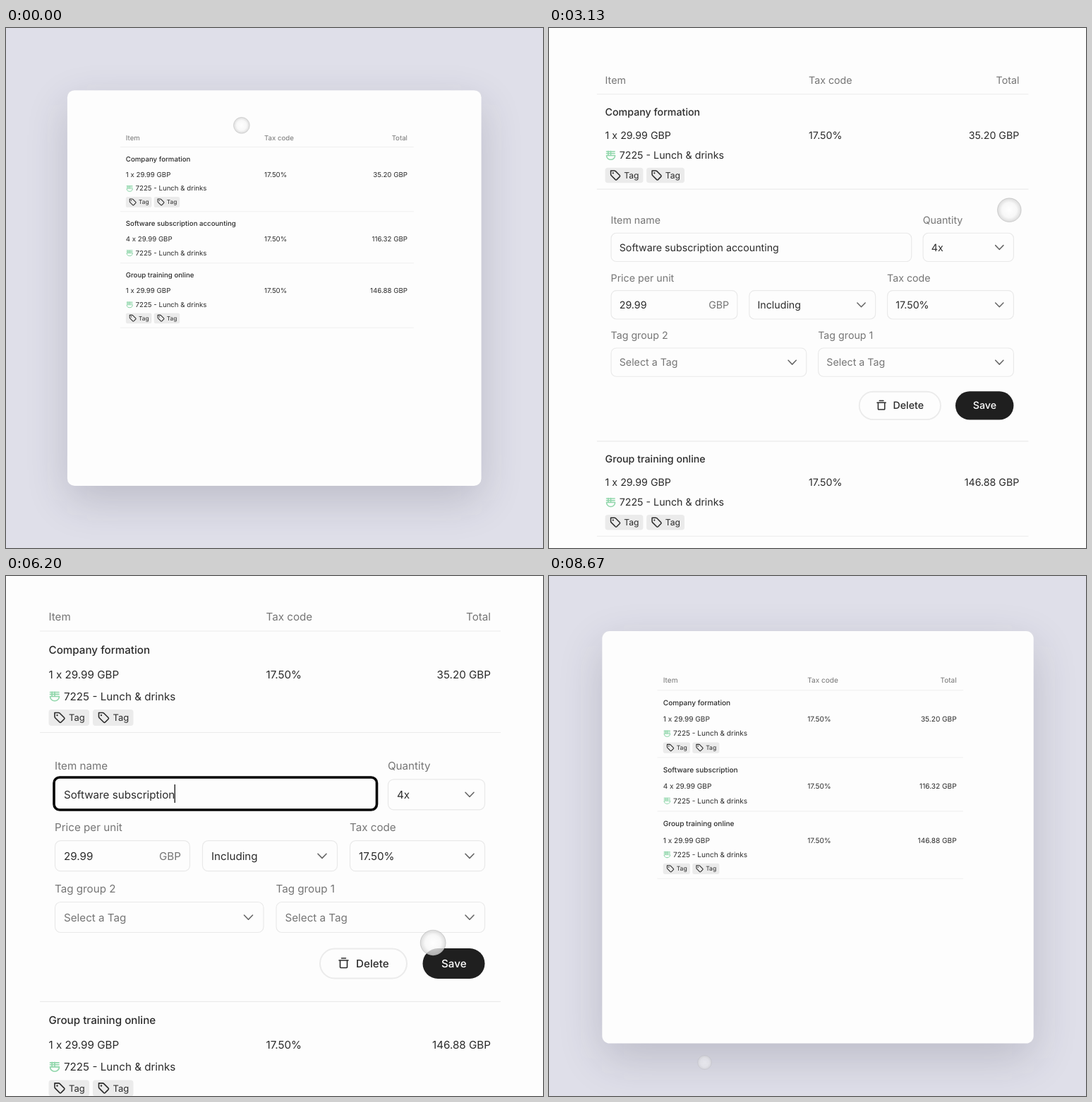
An HTML page for the animation above (8740 ms loop, 761 by 736 pixels).

```html
<!DOCTYPE html>
<html lang="en">
<head>
<meta charset="utf-8">
<title>Edit a line item</title>
<style>
  html, body { margin: 0; width: 100%; height: 100%; overflow: hidden; background: #dfdfe9; }
  svg { display: block; }
  text {
    font: 400 15.2px Inter, sans-serif; font-optical-sizing: none;
    fill: #2b2b2b; white-space: pre; text-rendering: geometricPrecision;
  }
  .muted { fill: #757575; }
  .bold { font-weight: 500; }
  .small { font-size: 13px; }
  .light { fill: #fff; }
  .rule { stroke: #ebebeb; stroke-width: 1.2; }
  .icon { fill: none; stroke: #2b2b2b; stroke-width: 1.6; stroke-linecap: round; stroke-linejoin: round; }
  .chevron { stroke: #666; }
  .field { fill: #fdfdfd; stroke: #e9e9e9; stroke-width: 1.2; }
</style>
</head>
<body>
<svg id="stage" width="761" height="736" viewBox="0 0 761 736"></svg>
<script>
const LOOP = 8740;
const FAR = 0.637;                 // camera scale when the whole card is visible
const FOCUS = { x: 361.7, y: 327 }; // point that stays put while zooming
const GROWTH = 266.3;              // extra row height while editing
const FULL_NAME = 'Software subscription accounting';
const SHORT_NAME = 'Software subscription';

// ---- drawing helpers: y is the middle of the capitals ----
const text = (x, y, str, cls = '', more = '') =>
  `<text x="${x}" y="${y + 5.5}" class="${cls}" ${more}>${str}</text>`;
const endText = (x, y, str, cls) => text(x, y, str, cls, 'text-anchor="end"');
const rule = y => `<path class="rule" d="M48 ${y}H701"/>`;
const at = (x, y, body, id = '') => `<g ${id && `id="${id}"`} transform="translate(${x} ${y})">${body}</g>`;
const chevron = (x, y) => at(x, y, '<path class="icon chevron" d="M-6-3L0 3.2 6-3"/>');

const bowl = (x, y) => at(x, y,
  `<path class="icon" style="stroke:#8fd6aa" d="M-6.5 0.5H6.5A6.5 6.3 0 0 1-6.5 0.5ZM-6.5-5.5H6M-6.5-2.6H6M-3.8-6V0M0-6V0"/>`);

const tag = (x, y) => at(x, y,
  `<rect y="-11.5" width="57.5" height="23" rx="4" fill="#ebebeb"/>
   <path class="icon" d="M8.500-7H14Q15 -7 15.700-6.300L22 0Q23 1 22 2L17.500 6.500Q16.500 7.400 15.500 6.500L9.200 .200Q8.500-.500 8.500-1.500Z"/>
   <circle cx="12" cy="-3.400" r="1.200" fill="#2b2b2b"/>` + text(28.5, -0.8, 'Tag', 'small'));

const row = (y, title, qty, total, tags, titleId = '') =>
  text(60.5, y, title, 'bold', titleId && `id="${titleId}"`) +
  text(60.5, y + 35, `${qty} x 29.99 GBP`) + text(368.5, y + 35, '17.50%') +
  endText(687, y + 35, total) +
  bowl(69, y + 65.5) + text(82, y + 65.5, '7225 - Lunch &amp; drinks') +
  (tags ? tag(60.5, y + 96) + tag(123, y + 96) : '');

const field = (x, y, width, label, value, { muted, select, labelX = x, id = '' } = {}) =>
  text(labelX, y - 41, label, 'muted') +
  `<rect id="${id}Box" class="field" x="${x + .5}" y="${y - 21.5}" width="${width}" height="43" rx="8"/>` +
  text(x + 13, y, value, muted ? 'muted' : '', id && `id="${id}Value"`) +
  (select ? chevron(x + width - 21, y) : '');

const trash = at(478.500, 548,
  '<path class="icon" d="M-6.500-4H6.500M-3-7H3M-5-4V5.500Q-5 6.500-4 6.500H4Q5 6.500 5 5.500V-4"/>');

const spinner = at(586, 548.5, Array.from({ length: 8 }, (_, i) =>
  `<path class="tick" d="M0-4V-7" stroke="#a8a8a8" stroke-width="1.7" stroke-linecap="round" transform="rotate(${i * 45})"/>`).join(''));

const form = `<g id="form">
  ${field(69, 309.3, 454.5, 'Item name', FULL_NAME, { id: 'name' })}
  ${field(541, 309.3, 137, 'Quantity', '4x', { select: true })}
  ${field(69, 396.2, 191, 'Price per unit', '29.99')}
  ${endText(248, 396.2, 'GBP', 'muted')}
  ${field(278, 396.2, 191, '', 'Including', { select: true })}
  ${field(487, 396.2, 191, 'Tax code', '17.50%', { select: true, id: 'tax' })}
  <g id="taxHover">
    <rect x="487.5" y="374.7" width="191" height="43" rx="8" fill="none" stroke="#999" stroke-width="1.2"/>
    <path class="icon" style="stroke:#c9c9c9;stroke-width:1.2" d="M625.500 391.500l10 10m0-10l-10 10"/>
  </g>
  ${field(69, 483, 295.5, 'Tag group 2', 'Select a Tag', { muted: true, select: true })}
  ${field(382.5, 483, 295.5, 'Tag group 1', 'Select a Tag', { muted: true, select: true })}
  <g id="focus">
    <rect x="68" y="285" width="457.5" height="46" rx="8" fill="none" stroke="#050505" stroke-width="3.6"/>
    <path id="caret" d="M0 295V321" stroke="#222" stroke-width="1.4"/>
  </g>
  <g id="delete">
    <rect x="445" y="527.5" width="123" height="42" rx="21" fill="#fdfdfd" stroke="#ebebeb" stroke-width="2"/>
    ${trash}${text(496, 548.3, 'Delete', 'bold')}
  </g>
  <g id="save">
    <rect x="590.500" y="527" width="88" height="43" rx="21.500" fill="#1f1f1f"/>
    ${text(617, 548.3, 'Save', 'bold light')}
  </g>
  <g id="saving">
    <rect x="552.500" y="527" width="126.500" height="43" rx="21.500" fill="#f3f3f3"/>
    ${spinner}${text(604, 548.3, 'Saving', 'bold', 'style="fill:#c4c4c4"')}
  </g>
</g>`;

const editButton = at(672, 252,
  '<path class="icon" d="M-5 4.500L-4.300 1 3-6.300 5.800-3.500-1.500 3.800ZM0 5.500H6"/>', 'edit');
const tooltip = `<g id="tooltip">
  <path d="M664 219.500h13l-6.500 7.500z" fill="#1f1f1f"/>
  <rect x="642" y="178.500" width="55" height="42" rx="5" fill="#1f1f1f"/>
  ${text(669.5, 198.7, 'Edit', 'bold light', 'text-anchor="middle"')}
</g>`;

const stage = document.getElementById('stage');
stage.innerHTML = `
<defs>
  <filter id="soft" x="-25%" y="-25%" width="150%" height="150%"><feGaussianBlur stdDeviation="48"/></filter>
  <radialGradient id="glass">
    <stop offset="0" stop-color="#fff" stop-opacity=".8"/>
    <stop offset=".62" stop-color="#f6f6f6" stop-opacity=".75"/>
    <stop offset="1" stop-color="#d2d2d2" stop-opacity=".8"/>
  </radialGradient>
</defs>
<rect width="761" height="736" fill="#dfdfe9"/>
<g id="world">
  <rect x="-69.700" y="-16" width="921" height="879" rx="16" fill="#1e1e32" opacity=".18" filter="url(#soft)"/>
  <rect x="-69.700" y="-48" width="921" height="879" rx="16" fill="#fdfdfd"/>
  ${text(60.5, 57, 'Item', 'muted')}${text(368.5, 57, 'Tax code', 'muted')}${endText(687, 57, 'Total', 'muted')}
  ${rule(78)}
  ${row(104.5, 'Company formation', 1, '35.20 GBP', true)}
  ${rule(221.5)}
  <g id="summary">${row(247.8, FULL_NAME, 4, '116.32 GBP', false, 'title')}${editButton}${tooltip}</g>
  <g id="below">${rule(336)}${row(362.6, 'Group training online', 1, '146.88 GBP', true)}${rule(479.5)}</g>
  ${form}
  <g id="cursor"><circle r="18" fill="url(#glass)" stroke="#000" stroke-opacity=".13" stroke-width="1"/></g>
</g>`;

const $ = Object.fromEntries([...stage.querySelectorAll('[id]')].map(el => [el.id, el]));
const ticks = [...stage.querySelectorAll('.tick')];

// ---- motion ----
const ramp = (t, from, to) => Math.min(1, Math.max(0, (t - from) / (to - from)));
const smooth = u => (1 - Math.cos(Math.PI * u)) / 2;
const spring = (t, start, rate) => {
  const x = Math.max(0, t - start) * rate;
  return 1 - (1 + x) * Math.exp(-x);
};
const fade = (el, v) => { el.style.opacity = v; el.style.display = v > 0 ? '' : 'none'; };

// from, to, start point, bend, end point
const MOVES = [
  [0, 1650, [318, 30], [400, 270], [672, 253]],
  [3350, 4250, [672, 253], [581, 592], [370, 306]],
  [5650, 6350, [370, 306], [500, 400], [634, 551]],
  [7980, 8690, [634, 551], [440, 760], [148, 872]],
];
function cursorAt(t) {
  const [from, to, a, b, c] = MOVES.filter(m => t >= m[0]).pop();
  const u = smooth(ramp(t, from, to)), v = 1 - u;
  return [0, 1].map(i => v * v * a[i] + 2 * u * v * b[i] + u * u * c[i]);
}

const CLICKS = [2520, 4350, 6420];
const press = t => CLICKS.reduce((s, c) => s - 0.14 * Math.max(0, 1 - Math.abs(t - c) / 110), 1);

function render(t) {
  const zoom = spring(t, 2650, .0066) - spring(t, 7960, .006);
  const k = FAR + (1 - FAR) * zoom;
  $.world.setAttribute('transform',
    `translate(${FOCUS.x * (1 - k)} ${FOCUS.y * (1 - k)}) scale(${k})`);

  const open = smooth(ramp(t, 2612, 2912)) - smooth(ramp(t, 7430, 7730));
  fade($.form, open);
  fade($.summary, 1 - open);
  $.below.setAttribute('transform', `translate(0 ${GROWTH * open})`);
  $.title.textContent = t < 5000 ? FULL_NAME : SHORT_NAME;
  fade($.edit, t < 4000 ? ramp(t, 1050, 1200) : 0);
  fade($.tooltip, t < 4000 ? ramp(t, 1680, 1800) : 0);

  fade($.taxHover, ramp(t, 3500, 3600) - ramp(t, 3800, 3930));

  const erased = Math.min(11, Math.max(0, Math.floor((t - 4560) / 55)));
  $.nameValue.textContent = FULL_NAME.slice(0, FULL_NAME.length - erased);
  const focused = t >= 4350 && t < 6420;
  fade($.focus, focused ? 1 : 0);
  if (focused) $.caret.setAttribute('transform', `translate(${82 + $.nameValue.getComputedTextLength()} 0)`);

  const saving = ramp(t, 6450, 6570);
  fade($.save, 1 - saving);
  fade($.saving, saving);
  $.delete.setAttribute('transform', `translate(${-39 * smooth(saving)} 0)`);
  const head = Math.floor(t / 100);
  ticks.forEach((el, i) => { el.style.opacity = 1 - ((head - i + 800) % 8) * .1; });

  const [x, y] = cursorAt(t);
  const leaving = ramp(t, 8350, 8740);
  $.cursor.setAttribute('transform', `translate(${x} ${y}) scale(${press(t) * (1 - .2 * leaving)})`);
  fade($.cursor, 1 - .5 * leaving);
}

const begin = performance.now();
function frame() {
  render((performance.now() - begin) % LOOP);
  requestAnimationFrame(frame);
}
frame();
</script>
</body>
</html>
```
